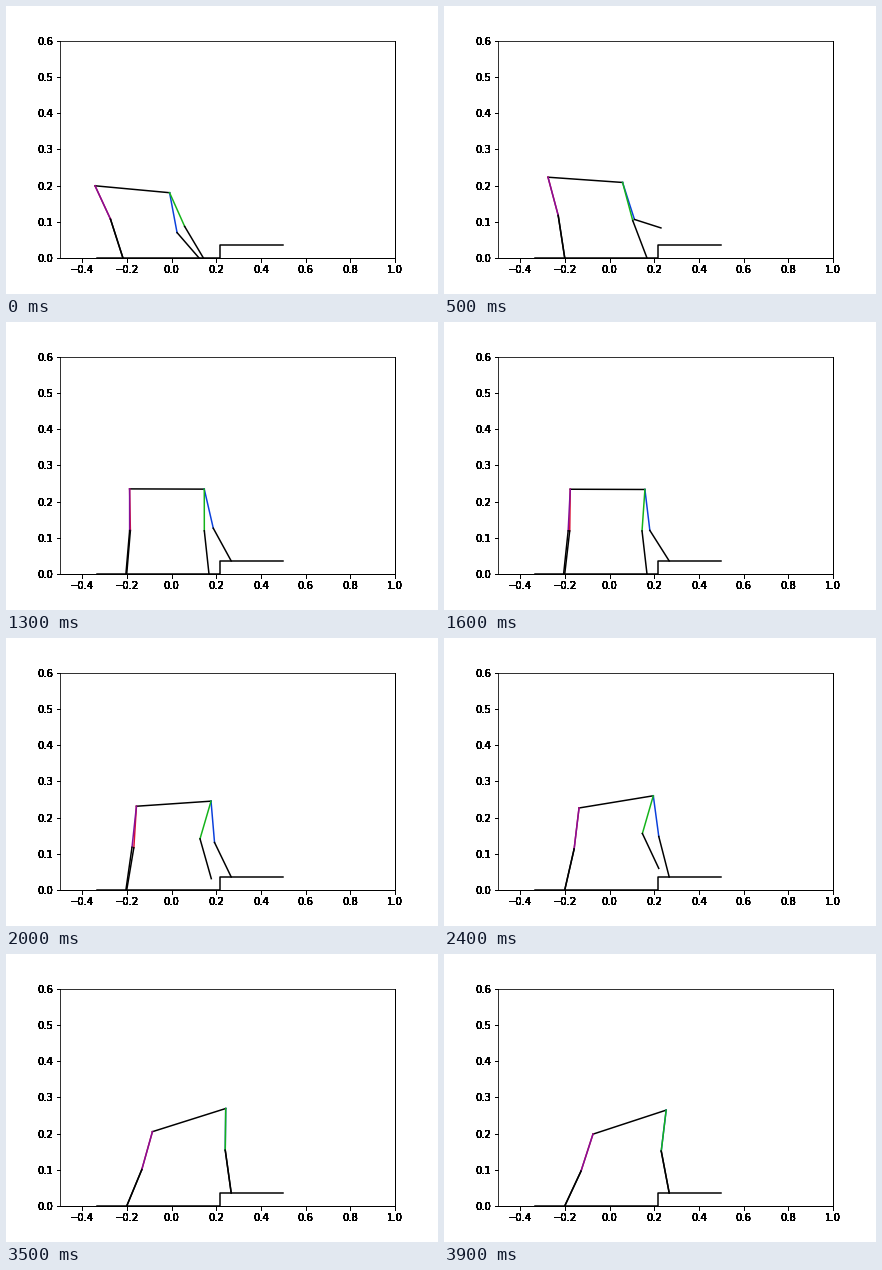
Recreate the animation shown at these times as a matplotlib script. Size 432 by 288 pixels, loop 4000 ms.

```python
import numpy as np
import matplotlib.pyplot as plt
from matplotlib.animation import FuncAnimation

FRAMES, INTERVAL = 40, 100
BODY, THIGH, SHANK = 0.3345, 0.115, 0.121
REAR_REACH = 0.2352
STEP_X, STEP_Y, LEDGE_END = 0.215, 0.036, 0.5
LANDING = 0.267
SWING = (17.5, 30)  # second front foot leaves the ground, then lands

# quick first stride: pose at a few moments, in units of INTERVAL
STRIDE = [0, 5, 6, 9]
HIP_X = [-0.343, -0.276, -0.2135, -0.1995]
FOOT_X = [0.123, 0.230, 0.287, LANDING]
FOOT_Y = [0, 0.083, 0.078, STEP_Y]


def ramp(t, start, end):
    return np.clip((t - start) / (end - start), 0, 1)


def ease(t, start, end):
    s = ramp(t, start, end)
    return s * s * (3 - 2 * s)


def solve_leg(hip, foot, side):
    """Knee and foot positions; side is +1 for a knee bent to the right."""
    dist = np.hypot(*(foot - hip))
    axis = (foot - hip) / dist
    dist = min(dist, THIGH + SHANK)
    along = (THIGH**2 - SHANK**2 + dist**2) / (2 * dist)
    bend = np.sqrt(max(THIGH**2 - along**2, 0))
    normal = np.array([-axis[1], axis[0]])
    return hip + along * axis + side * bend * normal, hip + dist * axis


def hips(t, pivot):
    """The rear hip circles its foot; the front hip follows the body pitch."""
    x = np.interp(t, STRIDE, HIP_X) + 0.0625 * (ramp(t, 9, 39) + ease(t, 9, 39))
    rear = np.array([x, np.sqrt(REAR_REACH**2 - (x - pivot)**2)])
    level = 1 - ramp(t, 0, 10)**2
    rise = 1 - (1 - ramp(t, SWING[0], FRAMES - 1))**2
    sin = -0.002 - 0.055 * level + 0.2 * rise
    return rear, rear + BODY * np.array([np.sqrt(1 - sin**2), sin])


def feet(t, pivot):
    settle, swing = ramp(t, 0, 5), ramp(t, *SWING)
    stance = 0.1425 + 0.025 * settle
    red = (pivot, 0)
    purple = (pivot - 0.005 * np.sin(np.pi * ramp(t, 9, 24)), 0)
    blue = (np.interp(t, STRIDE, FOOT_X), np.interp(t, STRIDE, FOOT_Y))
    green = (stance + (LANDING - stance) * ease(t, *SWING),
             STEP_Y * swing + 0.041 * np.sin(np.pi * swing))
    return red, purple, blue, green


fig = plt.figure(figsize=(6, 4), dpi=72, facecolor="white")
box = [0.125, 0.125, 0.775, 0.755]
ax = fig.add_axes(box)
# stacked see-through axes give the heavy labels and the darker spines
layers = [fig.add_axes(box, facecolor="none") for _ in range(12)]
for layer in [ax, *layers]:
    layer.set(xlim=(-0.5, 1), ylim=(0, 0.6))
    layer.set_xticks(np.arange(-2, 6) / 5)
    layer.set_yticks(np.arange(7) / 10)
for layer in layers:
    layer.spines[["left", "top"]].set_visible(False)


def make_line(color="black"):
    return ax.plot([], [], color=color, lw=1.5)[0]


def link(line, a, b):
    line.set_data([a[0], b[0]], [a[1], b[1]])


ax.plot([-0.335, STEP_X, STEP_X, LEDGE_END], [0, 0, STEP_Y, STEP_Y], color="black", lw=1.5)
body = make_line()
colors = [(0.86, 0.06, 0.2), (0.52, 0.06, 0.6), (0.04, 0.25, 0.86), (0.08, 0.7, 0.1)]
legs = [(make_line(color), make_line()) for color in colors]


def draw(t):
    pivot = -0.218 + 0.017 * ramp(t, 0, 5)
    rear, front = hips(t, pivot)
    link(body, rear, front)
    for i, (leg, foot) in enumerate(zip(legs, feet(t, pivot))):
        hip, side = (rear, 1) if i < 2 else (front, -1)
        knee, toe = solve_leg(hip, np.array(foot), side)
        link(leg[0], hip, knee)
        link(leg[1], knee, toe)
    return [body, *sum(legs, ())]


anim = FuncAnimation(fig, draw, frames=FRAMES, interval=INTERVAL, repeat=True, repeat_delay=0)
plt.show()
```
